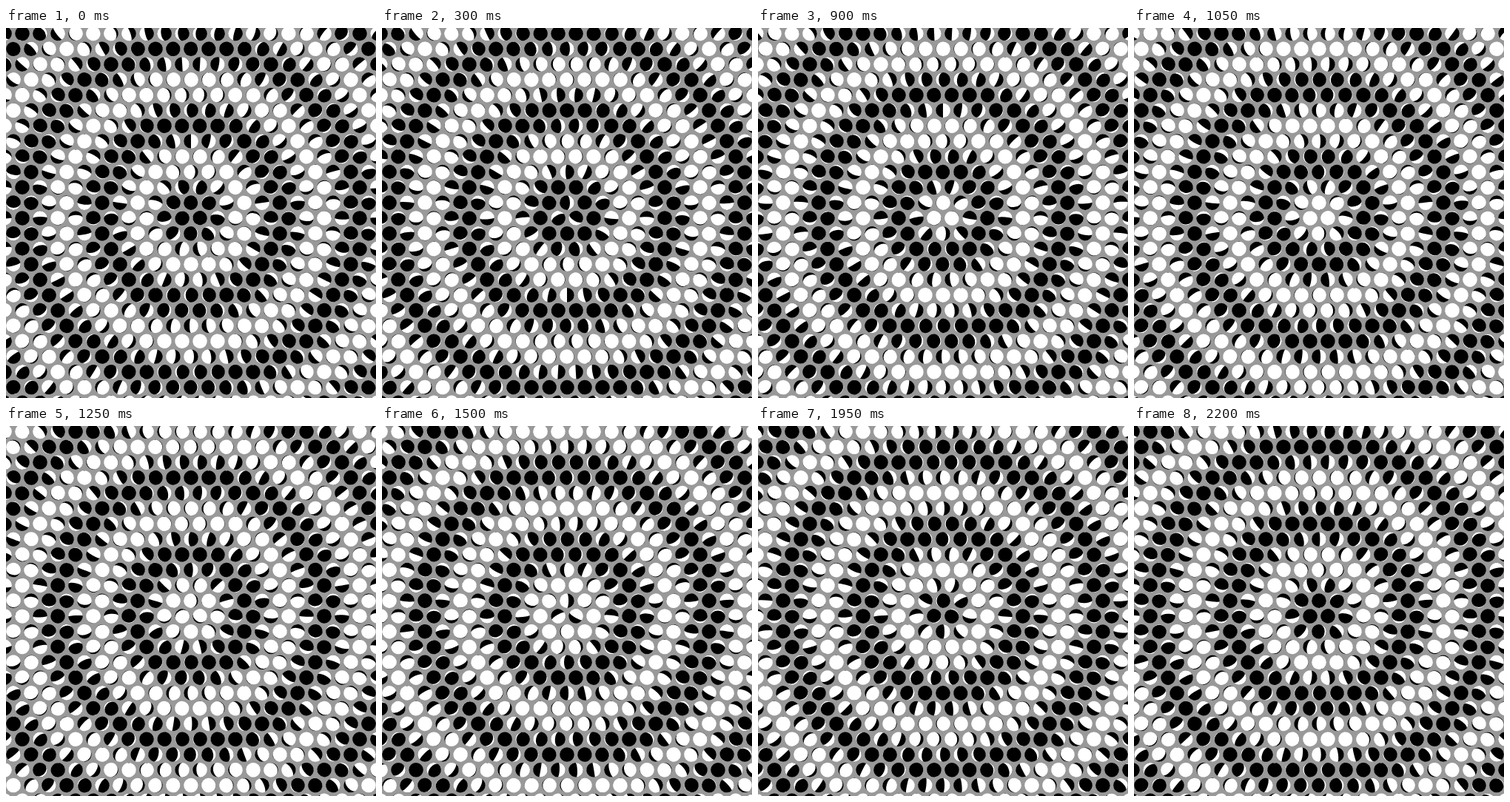
Recreate the animation shown at these times as an HTML page with a canvas. Size 500 px wide and 500 px high, loop 2250 ms.

```html
<!DOCTYPE html>
<html>
<head>
<meta charset="utf-8">
<style>
html, body { margin: 0; width: 100%; height: 100%; overflow: hidden; background: #999; }
canvas { display: block; width: 500px; height: 500px; }
</style>
</head>
<body>
<canvas id="stage" width="500" height="500"></canvas>
<script>
const ctx = document.getElementById('stage').getContext('2d');
const SIZE = 500, MID = SIZE / 2, TAU = Math.PI * 2;
const GAP = 24, ROW = GAP * Math.sqrt(3) / 2, RADIUS = 9.8;
const WAVE = 104, START = 19;
const LOOP = 2250, STEP = 50;

// Triangular lattice centred on the middle of one triangle.
const balls = [];
for (let j = -12; j <= 13; j++) {
  for (let i = -12; i <= 12; i++) {
    const x = (i + (j & 1) / 2) * GAP;
    const y = j * ROW - GAP / Math.sqrt(3);
    balls.push({ x, y, dist: Math.hypot(x, y), angle: Math.atan2(y, x) });
  }
}

// A half black, half white ball turned about its radial axis.
function drawBall(ball, turn) {
  const face = Math.cos(turn);
  const side = Math.sin(turn) > 0 ? -1 : 1;
  const dark = face > 0;
  ctx.save();
  ctx.translate(MID + ball.x, MID + ball.y);
  ctx.rotate(ball.angle);
  ctx.fillStyle = dark ? '#000' : '#fff';
  ctx.beginPath();
  ctx.arc(0, 0, RADIUS, 0, TAU);
  ctx.fill();

  // Crescent of the other colour, on the side facing away.
  ctx.scale(1, dark ? side : -side);
  ctx.fillStyle = dark ? '#fff' : '#000';
  ctx.beginPath();
  ctx.arc(0, 0, RADIUS, 0, Math.PI);
  ctx.ellipse(0, 0, RADIUS, RADIUS * Math.abs(face), 0, Math.PI, 0, true);
  ctx.fill();
  ctx.restore();
}

function draw(now) {
  const time = Math.floor((now % LOOP) / STEP) * STEP;
  ctx.fillStyle = '#999';
  ctx.fillRect(0, 0, SIZE, SIZE);
  for (const ball of balls) {
    drawBall(ball, TAU * ((ball.dist - START) / WAVE - time / LOOP));
  }
}

function loop(now) {
  draw(now);
  requestAnimationFrame(loop);
}
draw(0);
requestAnimationFrame(loop);
</script>
</body>
</html>
```
